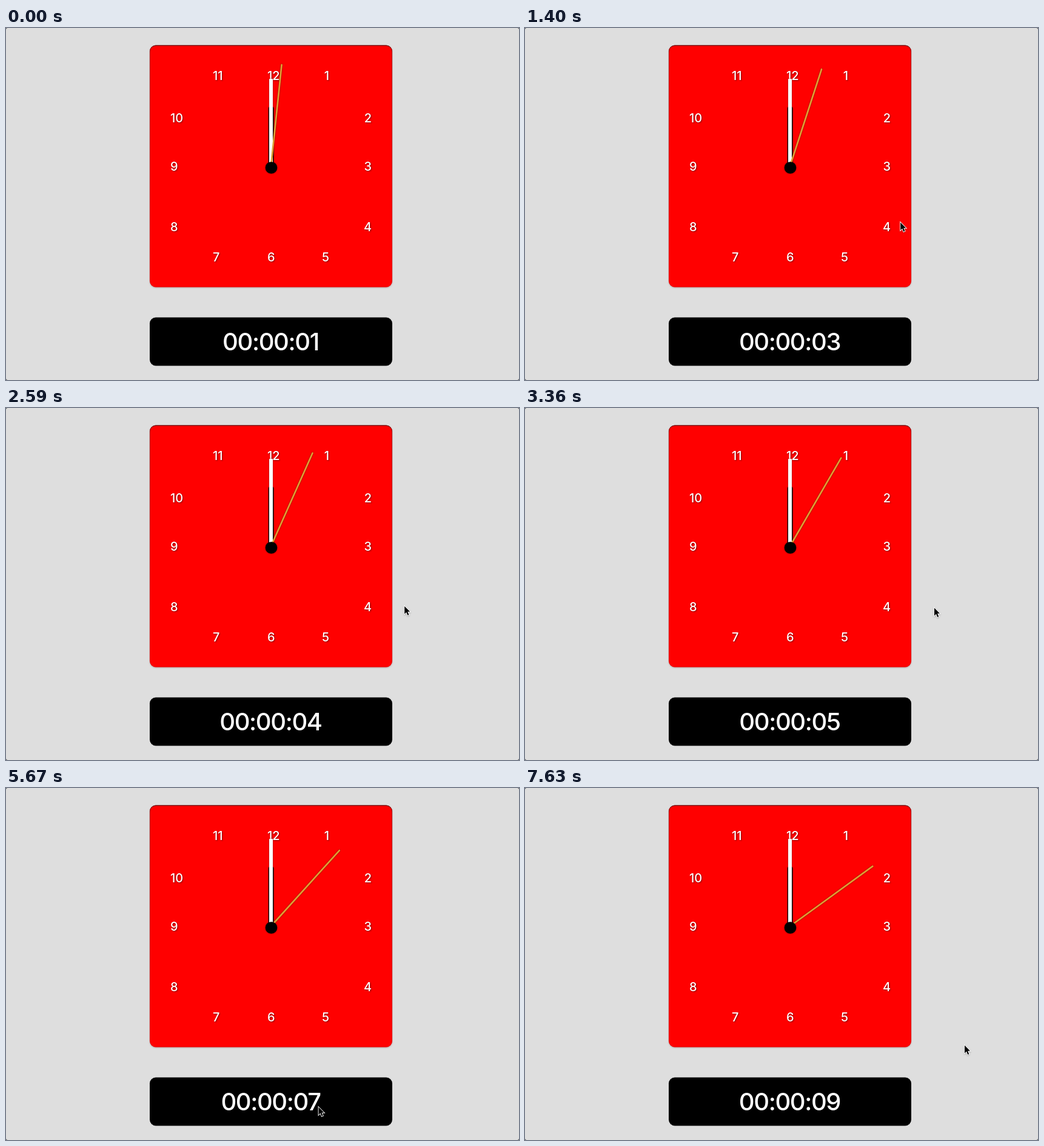
These frames come from a looping animation (846 by 582 pixels, 8000 ms). An HTML page:

```html
<!DOCTYPE html>
<html lang="en">
<head>
<meta charset="utf-8">
<title>Clock</title>
<style>
  html, body { margin: 0; width: 100%; height: 100%; overflow: hidden; background: #444; }
  svg { display: block; width: 846px; height: 582px; background: #dedede; border-radius: 3px; }
  text { font-family: Inter, "Open Sans", sans-serif; font-weight: 450; fill: #fff; }
  #face { filter: drop-shadow(0 1px 1px rgba(120, 60, 60, .35)); }
  #numbers { font-size: 20px; filter: drop-shadow(1px 1px 1px rgba(0, 0, 0, .5)); }
  #digits { font-size: 40px; letter-spacing: -.035em; text-anchor: middle; }
  #hands { filter: drop-shadow(.5px 0 1px rgba(0, 0, 0, .5)); }
  #cursor { filter: drop-shadow(0 1px 1px rgba(0, 0, 0, .25)); }
</style>
</head>
<body>
<svg viewBox="0 0 846 582">
  <defs>
    <linearGradient id="edge" x2="0" y2="1">
      <stop stop-color="#000" stop-opacity=".75"/>
      <stop offset=".03" stop-color="#000" stop-opacity=".3"/>
      <stop offset="1" stop-color="#000" stop-opacity=".1"/>
    </linearGradient>
  </defs>
  <g id="face">
    <rect x="237" y="28.5" width="400" height="400" rx="10" fill="#f00"/>
    <rect x="237.5" y="29" width="399" height="399" rx="9.5" fill="none" stroke="url(#edge)"/>
  </g>
  <g id="numbers"></g>
  <g id="hands">
    <rect x="432.8" y="130" width="8.6" height="98" rx="3"/>
    <rect x="434" y="84" width="6" height="144" rx="1" fill="#fff"/>
    <line id="second" x1="437" y1="228.5" x2="437" y2="60" stroke="#dd9f35" stroke-width="2.7" stroke-linecap="round"/>
    <circle cx="437.5" cy="231" r="9.8"/>
  </g>
  <rect x="237" y="478.5" width="400" height="80" rx="10"/>
  <text id="digits" x="436.5" y="532.5">00:00:01</text>
  <path id="cursor" d="M1 1.6V14.4L4 11.6L6.2 16.8L8.3 15.9L6.1 10.8H10Z" stroke="#fff" stroke-width="1.8" paint-order="stroke"/>
</svg>
<script>
  const LOOP = 8000, STEP = 70, TICK = 15 * STEP, FIRST_TICK = 3 * STEP, TRAVEL = 6 * STEP;
  const byId = id => document.getElementById(id);
  const second = byId('second'), digits = byId('digits'), cursor = byId('cursor');

  function addNumber(label, x, y, anchor) {
    const text = document.createElementNS('http://www.w3.org/2000/svg', 'text');
    text.textContent = label;
    text.setAttribute('x', x);
    text.setAttribute('y', y);
    text.setAttribute('text-anchor', anchor);
    byId('numbers').append(text);
  }

  // Mirrored pairs hang from the left and right margins of each row.
  function addRow(y, left, right, reach) {
    addNumber(left, 436 - reach, y, 'start');
    addNumber(right, 438 + reach, y, 'end');
  }
  addRow(85.7, 11, 1, 95);
  addRow(155.7, 10, 2, 165);
  addRow(235.7, 9, 3, 165);
  addRow(335.7, 8, 4, 165);
  addRow(385.7, 7, 5, 95);
  addNumber(12, 431, 85.7, 'start');
  addNumber(6, 431, 385.7, 'start');

  // The pointer reaches each stop at time t, then rests until the next trip.
  const stops = [
    { t: 0, x: 277, y: 553 },
    { t: 350, x: 609, y: 470 },
    { t: 770, x: 672, y: 391.5 },
    { t: 980, x: 648, y: 329 },
    { t: 1680, x: 533, y: 294 },
    { t: 2380, x: 650, y: 325 },
    { t: 2870, x: 674, y: 329 },
    { t: 4410, x: 684, y: 395.5 },
    { t: 5460, x: 514.5, y: 526 },
    { t: 6160, x: 538, y: 522 },
    { t: 7420, x: 724, y: 424 }
  ];
  const ease = p => p * p * (3 - 2 * p);

  function pointerAt(t) {
    const next = stops.findIndex(stop => stop.t > t);
    if (next < 0) return stops.at(-1);
    const from = stops[next - 1], to = stops[next];
    const duration = Math.min(TRAVEL, to.t - from.t);
    const p = ease(Math.max(0, 1 - (to.t - t) / duration));
    return { x: from.x + (to.x - from.x) * p, y: from.y + (to.y - from.y) * p };
  }

  function draw(now) {
    const t = Math.floor(now % LOOP / STEP) * STEP;
    const seconds = 2 + Math.floor((t - FIRST_TICK) / TICK);
    second.setAttribute('transform', `rotate(${seconds * 6} 437 228.5)`);
    digits.textContent = '00:00:' + String(seconds).padStart(2, '0');
    const { x, y } = pointerAt(t);
    cursor.setAttribute('transform', `translate(${x} ${y})`);
    cursor.setAttribute('visibility', t < STEP ? 'hidden' : 'visible');
  }

  const start = performance.now();
  function frame() {
    draw(performance.now() - start);
    requestAnimationFrame(frame);
  }
  frame();
</script>
</body>
</html>
```
